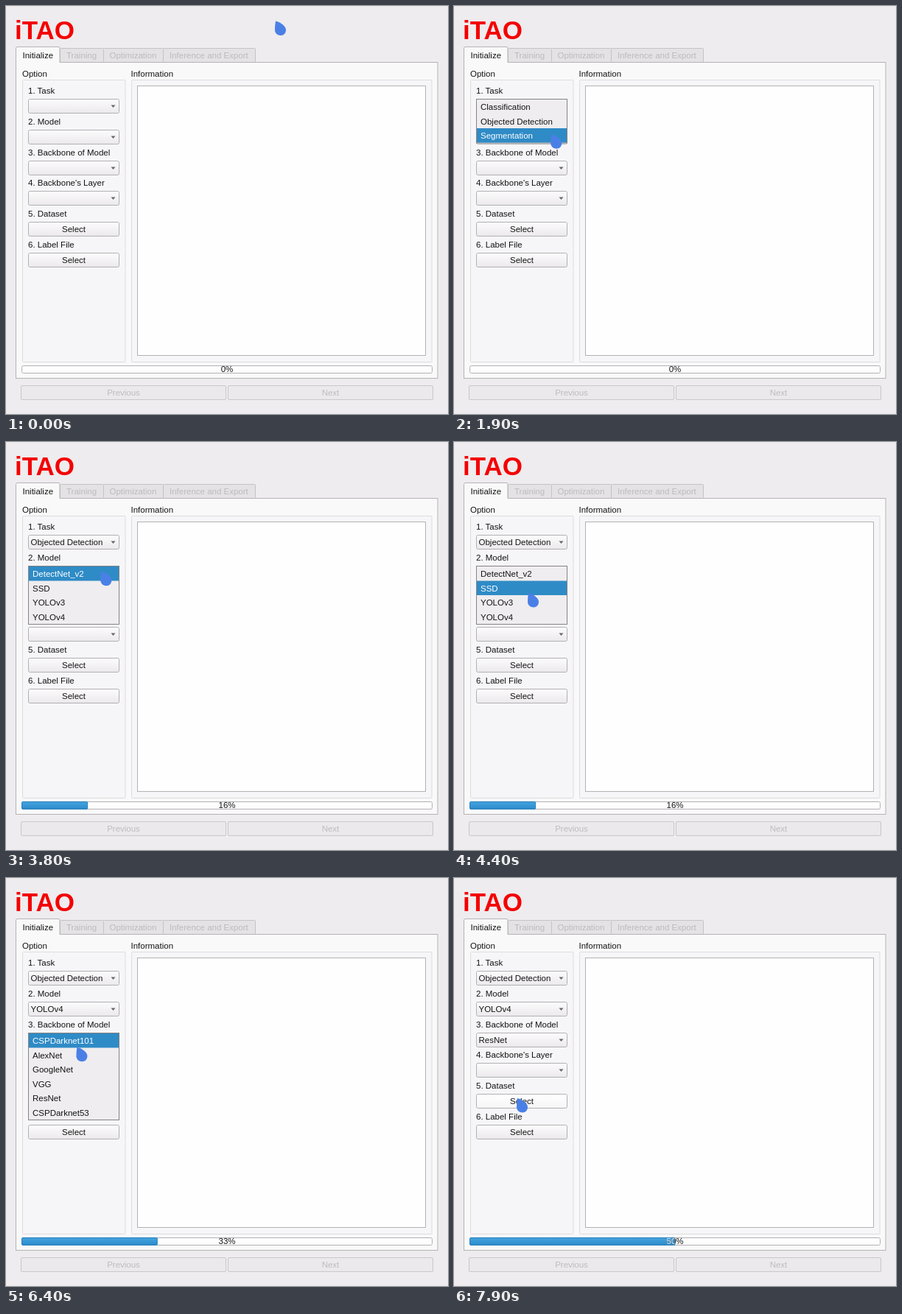
An HTML page that plays this animation: 600 px wide and 554 px high, repeating every 8 s.

```html
<!DOCTYPE html>
<html lang="en">
<head>
<meta charset="utf-8">
<title>iTAO</title>
<style>
html, body { margin: 0; width: 100%; height: 100%; overflow: hidden; background: #eeecee; }
svg { display: block; width: 600px; height: 554px; font: 11.5px "Liberation Sans", Arial, sans-serif; }
text { white-space: pre; }
</style>
</head>
<body>
<svg viewBox="0 0 600 554">
  <defs>
    <linearGradient id="button" x2="0" y2="1"><stop stop-color="#fdfcfd"/><stop offset="1" stop-color="#ebe9eb"/></linearGradient>
    <linearGradient id="hover" x2="0" y2="1"><stop stop-color="#fff"/><stop offset="1" stop-color="#f6f5f6"/></linearGradient>
    <linearGradient id="bar" x2="0" y2="1"><stop stop-color="#45a3e0"/><stop offset="1" stop-color="#2b8aca"/></linearGradient>
    <clipPath id="filled"><rect id="clip" x="21" y="488" height="11"/></clipPath>
  </defs>
  <g id="frame"></g>
  <g id="form"></g>
  <path id="cursor" fill="#4a80e6" d="M1 0Q0 6 0 12C0 16.500 3.500 19.500 8 19.500C12 19.500 15 16.500 15 12C15 7 8 1.500 1 0Z"/>
</svg>
<script>
const LOOP = 8000, STEP = 100, ROW = 19.5;
const $ = id => document.getElementById(id);

const rect = (x, y, w, h, fill, stroke = 'none', r = 0) =>
  `<rect x="${x}" y="${y}" width="${w}" height="${h}" rx="${r}" fill="${fill}" stroke="${stroke}"/>`;
const text = (s, x, y, fill = '#151515', extra = '') =>
  `<text x="${x}" y="${y}" fill="${fill}" ${extra}>${s}</text>`;
const centered = (s, x, y, fill, extra = '') => text(s, x, y, fill, 'text-anchor="middle" ' + extra);

const labels = ['Task', 'Model', 'Backbone of Model', "Backbone's Layer", 'Dataset', 'Label File'];
const boxTop = i => Math.round(126.2 + 41.75 * i) + 0.5;

// press, open and close are times in ms
const choices = [
  { press: 1300, open: 1400, close: 3000, value: 'Objected Detection', percent: 16,
    items: ['Classification', 'Objected Detection', 'Segmentation'] },
  { press: 3400, open: 3500, close: 5400, value: 'YOLOv4', percent: 33,
    items: ['DetectNet_v2', 'SSD', 'YOLOv3', 'YOLOv4'] },
  { press: 5900, open: 6000, close: 7700, value: 'ResNet', percent: 50,
    items: ['CSPDarknet101', 'AlexNet', 'GoogleNet', 'VGG', 'ResNet', 'CSPDarknet53'] }
];

// time, x, y of the pointer tip
const path = [
  [0, 365, 20.5], [900, 165, 110], [1300, 129, 129], [1500, 129, 132], [1800, 131, 182],
  [2100, 132, 152], [2300, 132, 152], [2700, 138, 157.5], [3000, 138, 157.5], [3400, 138, 171],
  [3700, 130, 174], [4400, 100, 205], [4800, 92, 226], [5200, 90, 229], [5400, 90, 229],
  [5900, 96, 214], [6200, 96, 217], [6900, 93, 281], [7500, 85, 299], [8000, 85, 299]
];

function pointer(t) {
  const i = path.findIndex(p => p[0] > t);
  const [t0, x0, y0] = path[i - 1], [t1, x1, y1] = path[i];
  const u = (t - t0) / (t1 - t0), e = u * u * (3 - 2 * u);
  return [x0 + (x1 - x0) * e, y0 + (y1 - y0) * e];
}

function drawFrame() {
  const tabs = [['Training', 73, 132, 82], ['Optimization', 132, 213, 140.5], ['Inference and Export', 213, 338, 222]];
  const buttons = [['Previous', 20.5], ['Next', 301.5]];
  return text('iTAO', 12, 45.3, '#f40000', 'font-size="35" font-weight="bold"') +
    tabs.map(([name, from, to, x]) =>
      rect(from + 0.5, 57.5, to - from, 19, '#e4e2e4', '#c4c2c4', 1) + text(name, x, 71, '#bdbbbd')).join('') +
    rect(13.5, 76.5, 572.5, 429, '#faf9fa', '#b5b3b5') +
    '<path d="M13.500 78V57.500q0-2 2-2H71q2 0 2 2V76.500" fill="#faf9fa" stroke="#b5b3b5"/>' +
    rect(14, 76, 58.5, 2, '#faf9fa') +
    text('Initialize', 22.5, 70.5) + text('Option', 22, 95.5) + text('Information', 169.5, 95.5) +
    rect(22.5, 100.5, 139.5, 383, '#f6f5f7', '#dddbdd', 1) +
    rect(170.5, 100.5, 407.5, 383, '#f6f5f7', '#dddbdd', 1) +
    rect(178.5, 108.5, 391, 366, '#fefefe', '#b3b1b3') +
    buttons.map(([name, x]) =>
      rect(x, 515.5, 278, 19, '#ebe9eb', '#c9c7c9', 1.5) + centered(name, x + 139, 529, '#bebcbe')).join('');
}

function drawField(i, t) {
  const y = boxTop(i), choice = choices[i], isButton = i > 3;
  const pressed = choice && t >= choice.press && t < choice.open;
  const hovered = i === 4 && t >= choices[2].close;
  const fill = pressed ? '#d9d7d9' : hovered ? 'url(#hover)' : 'url(#button)';
  let out = text(`${i + 1}. ${labels[i]}`, 30, y - 7.2) + rect(30.5, y, 123, 19, fill, '#b2b0b2', 2);
  if (isButton) out += centered('Select', 92, y + 13.6);
  else out += `<path d="M142.500 ${y + 8}h6l-3 3.500z" fill="#666"/>`;
  if (choice && t >= choice.close) out += text(choice.value, 33.5, y + 13.6);
  return out;
}

function drawPopup(i, tipY) {
  const { items } = choices[i], y = boxTop(i);
  const active = Math.max(0, Math.min(items.length - 1, Math.floor((tipY - y - 0.5) / ROW)));
  return rect(30.5, y, 123, items.length * ROW + 1, '#efedef', '#858385') +
    items.map((item, row) => {
      const top = y + 0.5 + row * ROW, on = row === active;
      return (on ? rect(31, top, 122, ROW, '#2f8bc6') : '') +
        text(item, 36, top + 14, on ? '#fff' : undefined);
    }).join('');
}

function drawProgress(percent) {
  const width = 557 * percent / 100, label = percent + '%';
  $('clip').setAttribute('width', width);
  return rect(21.5, 488.5, 557, 10, '#fdfdfd', '#b3b1b3', 2) +
    (percent ? rect(21.5, 488.5, width, 10, 'url(#bar)', '#2a7fb8', 1.5) : '') +
    centered(label, 300, 497.2) + centered(label, 300, 497.2, '#fff', 'clip-path="url(#filled)"');
}

let shown = '';
function render(now) {
  const t = Math.floor(now % LOOP / STEP) * STEP;
  const [x, y] = pointer(t);
  const done = choices.filter(c => t >= c.close);
  const open = choices.findIndex(c => t >= c.open && t < c.close);
  const form = labels.map((_, i) => drawField(i, t)).join('') +
    drawProgress(done.length ? done[done.length - 1].percent : 0) +
    (open < 0 ? '' : drawPopup(open, y));
  if (form !== shown) $('form').innerHTML = shown = form;
  $('cursor').setAttribute('transform', `translate(${x} ${y})`);
}

$('frame').innerHTML = drawFrame();
const start = performance.now();
function tick() {
  render(performance.now() - start);
  requestAnimationFrame(tick);
}
tick();
</script>
</body>
</html>
```
